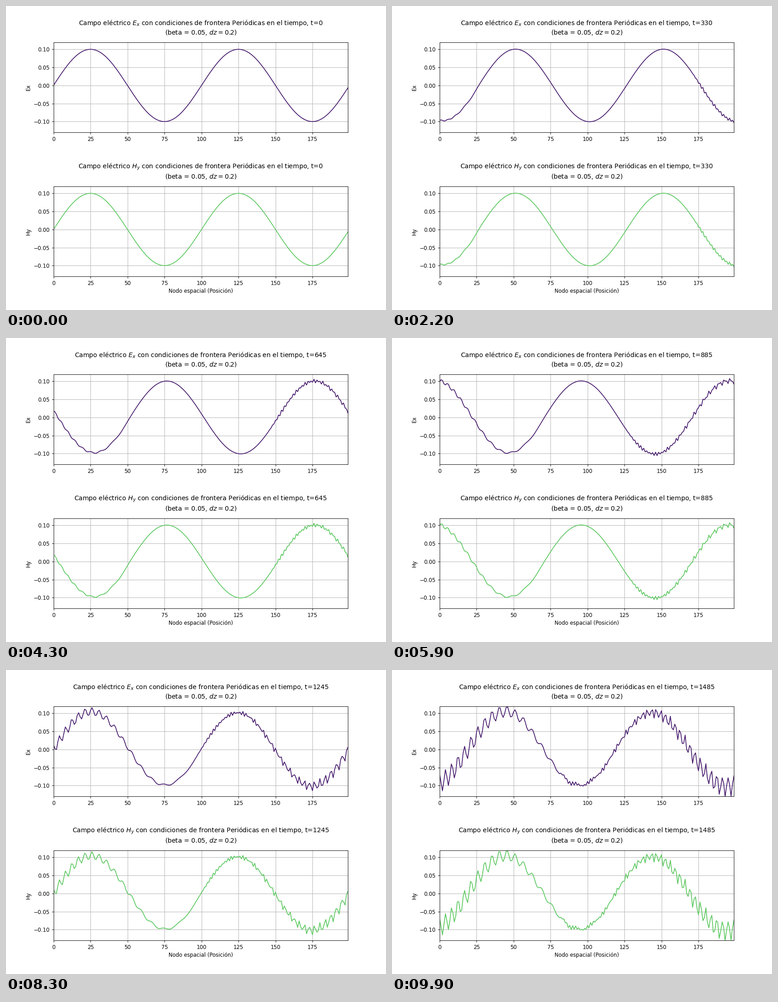
Write a matplotlib script that moves like this. It is 837 by 669 pixels and loops after 10 s.

```python
import numpy as np
import matplotlib.pyplot as plt
from matplotlib.animation import FuncAnimation

W, H, DPI = 837, 669, 83.7
NODES = 200
FRAMES, STRIDE = 100, 15
COURANT = 0.08


def step(f, g):
    """Explicit centred update of f driven by g; both end nodes share one slope."""
    slope = np.empty(NODES)
    slope[1:-1] = g[2:] - g[:-2]
    slope[0] = slope[-1] = g[1] - g[-2]
    return f - COURANT / 2 * slope


def simulate():
    ex = 0.1 * np.sin(2 * np.pi * np.arange(NODES) / 100)
    hy = ex.copy()
    history = []
    for t in range(FRAMES * STRIDE):
        if t % STRIDE == 0:
            history.append((ex, hy))
        ex, hy = step(ex, hy), step(hy, ex)
    return history


def heading(field, t):
    return (f"Campo eléctrico ${field}$ con condiciones de frontera "
            f"Periódicas en el tiempo, t={t}\n(beta = 0.05, $dz=0.2$)")


history = simulate()

# The tiny margin keeps the pixel size from rounding down.
fig, axes = plt.subplots(
    2, 1, figsize=((W + 1e-6) / DPI, (H + 1e-6) / DPI), dpi=DPI)
fig.subplots_adjust(left=0.125, right=0.9, bottom=0.11, top=0.88, hspace=0.6)

FIELDS = ("E_x", "H_y")
lines, titles = [], []
for ax, field, shade in zip(axes, FIELDS, (0.075, 0.75)):
    line, = ax.plot(np.arange(NODES), history[0][0], color=plt.cm.viridis(shade))
    ax.set_xlim(0, NODES - 1)
    ax.set_ylim(-0.1303, 0.1189)
    ax.set_ylabel(field.replace("_", ""))
    ax.grid(True)
    lines.append(line)
    titles.append(ax.set_title(heading(field, 0), pad=15))
axes[1].set_xlabel("Nodo espacial (Posición)")


def update(i):
    for line, title, field, values in zip(lines, titles, FIELDS, history[i]):
        line.set_ydata(values)
        title.set_text(heading(field, i * STRIDE))
    return lines + titles


anim = FuncAnimation(fig, update, frames=FRAMES, interval=100,
                     repeat=True, repeat_delay=0, blit=False)
plt.show()
```
